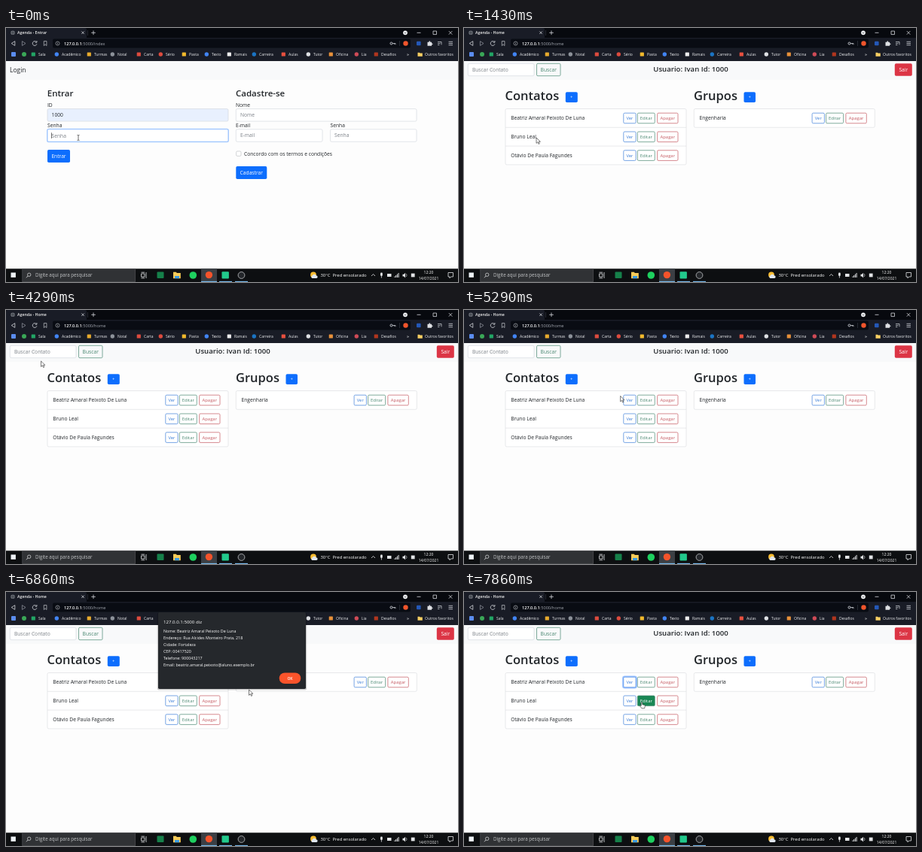
An HTML page that plays this animation: 600x338 px, repeating every 8000 ms.

```html
<!DOCTYPE html>
<html lang="pt-BR">
<head>
<meta charset="utf-8">
<title>Agenda</title>
<style>
html, body { margin: 0; width: 100%; height: 100%; overflow: hidden; background: #fdfdfd; }
svg { display: block; width: 100%; height: 100%; }
text { font-family: "Open Sans", "Noto Sans", sans-serif; white-space: pre; }
</style>
</head>
<body>
<svg id="stage" viewBox="0 0 600 338"></svg>
<script>
const LOOP = 8000, FPS = 7;
const BLUE = '#0d6efd', GREEN = '#198754', RED = '#dc3545', INK = '#212529', GREY = '#7b8087';
// Softer tones for thin outlines and their labels
const SOFT = { [BLUE]: '#3d7fd8', [GREEN]: '#4a8871', [RED]: '#c4575f' };
const stage = document.getElementById('stage');

// Markup helpers
const rect = (x, y, w, h, fill, extra = '') =>
  `<rect x="${x}" y="${y}" width="${w}" height="${h}" fill="${fill}" ${extra}/>`;
const circle = (x, y, r, fill, extra = '') =>
  `<circle cx="${x}" cy="${y}" r="${r}" fill="${fill}" ${extra}/>`;
const text = (x, y, size, str, fill = INK, extra = '') =>
  `<text x="${x}" y="${y}" font-size="${size}" fill="${fill}" ${extra}>${str}</text>`;
const line = (d, color = '#d5d7dc', w = 0.8, extra = '') =>
  `<path d="${d}" fill="none" stroke="${color}" stroke-width="${w}" ${extra}/>`;
const group = (id, body) => `<g id="${id}">${body}</g>`;
const MID = 'text-anchor="middle"', BOLD = 'font-weight="600"';

const heading = (x, y, size, str) => text(x, y, size, str, INK, BOLD);
const label = (x, y, str) => text(x, y, 6.7, str);
const field = (x, y, w, hint, fill = '#fff', h = 16.5) =>
  rect(x, y, w, h, fill, 'rx="1.8" stroke="#ced4da" stroke-width=".6"') +
  text(x + 5.6, y + h / 2 + 2.4, 6.7, hint, GREY);
const solid = (x, y, w, h, str, fill, size = 6.7) =>
  rect(x, y, w, h, fill, 'rx="1.8"') + text(x + w / 2, y + h / 2 + size * 0.36, size, str, '#fff', MID);

// Outline buttons that fill on hover
const buttons = [];
function outline(x, y, w, h, str, color, size = 5.9) {
  buttons.push({ x, y, w, h, color });
  return `<g class="btn">` +
    rect(x, y, w, h, 'transparent', `rx="1.5" stroke="${SOFT[color]}" stroke-width=".7"`) +
    text(x + w / 2, y + h / 2 + size * 0.36, size, str, SOFT[color], MID) + '</g>';
}
const contactRow = (x, y, name) =>
  text(x + 7.2, y + 15.2, 6.7, name) +
  outline(x + 156.8, y + 6.2, 16.3, 13.6, 'Ver', BLUE) +
  outline(x + 175.3, y + 6.2, 23, 13.6, 'Editar', GREEN) +
  outline(x + 201.6, y + 6.2, 27.4, 13.6, 'Apagar', RED);
function list(x, names) {
  const h = 24.8;
  return rect(x, 107.5, 240, h * names.length, '#fff', 'rx="1.8" stroke="#d9dbdd" stroke-width=".6"') +
    names.map((n, i) =>
      (i ? line(`M${x} ${107.5 + h * i}h240`, '#d9dbdd', 0.6) : '') + contactRow(x, 107 + h * i, n)).join('');
}

function browser() {
  const marks = [
    [43, 'Sala', '#22a565'], [74, 'Acadêmico', '#4285f4'], [117, 'Turmas', '#e8ab2d'],
    [148, 'Notal', '#8d929a'], [183, 'Carta', '#dd4b3e'], [212, 'Sério', '#dd4b3e'],
    [243, 'Pasta', '#f2b92c'], [273, 'Texto', '#4285f4'], [303, 'Ramais', '#eeeeee'],
    [336, 'Carreira', '#1b74c4'], [375, 'Aulas', '#e8503f'], [408, 'Tutor', '#dfe1e4'],
    [438, 'Oficina', '#e8913a'], [472, 'Lia', '#cf4b57'], [498, 'Desafios', '#b1361e']];
  const pale = '#c6c9cf';
  return rect(0, 0, 600, 13, '#07090e') + rect(0, 13, 600, 31, '#191c26') +
    '<path d="M0 13V2q0-2 2-2H105q2 0 2 2V13z" fill="#191c26"/>' +
    circle(9, 6.3, 2.8, '#6d7179') + line('M6.3 6.3h5.4M9 3.6v5.4', '#272a32', 0.6) +
    text(15, 8.3, 5.25, '', '#f1f1f1', 'id="tab" ' + BOLD) +
    line('M100.3 4.5l3.5 3.5m0-3.5l-3.5 3.5') + line('M108.5 3v7', '#454954', 0.5) +
    line('M113.2 6.3h5.6M116 3.5v5.6') +
    circle(530, 6.3, 2.9, '#eef0f2') + line('M528.7 5.8l1.3 1.4 1.3-1.4', '#15171e', 0.6) +
    line('M545.5 6.3h5M567 4.1h4.5v4.5h-4.5zM587.8 4.1l4.5 4.5m0-4.5l-4.500 4.5') +
    line('M11.8 17.6v5.8l-4.6-2.9z') + line('M21.4 17.6v5.8l4.6-2.9z', '#8b8f98') +
    line('M40.3 18.6a2.9 2.9 0 1 0 .6 2.7M40.9 17v2.2h-2.2') +
    line('M50.3 17.5h3.6v6l-1.8-1.6-1.8 1.6z', pale, 0.7) +
    rect(62, 14.6, 475, 11.8, '#090c13', 'rx="2"') +
    circle(68.5, 20.5, 2.5, 'none', `stroke="${pale}" stroke-width=".6"`) +
    line('M68.5 20v1.8M68.5 18.8v.6', pale, 0.6) +
    text(77, 22.6, 5.6, `<tspan fill="#fff" ${BOLD}>127.0.0.1</tspan><tspan id="path"></tspan>`, '#a4a8b0') +
    circle(511.5, 20.5, 1.5, 'none', `stroke="${pale}"`) + line('M513 20.5h4v1.7m-1.7-1.7v1.4', pale) +
    line('M522.5 17v7', '#444853', 0.5) + circle(530.5, 20.5, 3.2, '#f2552c') +
    rect(545, 17.8, 5.6, 5.4, '#2458b8', 'rx="1"') +
    '<path d="M559.5 18.8h2q-.4-1.6.8-1.6t.8 1.6h2v1.7q1.400-.2 1.400.8t-1.400.8v1.700h-5.600z" fill="#dfe1e5"/>' +
    line('M573 18.5h5m-5 2h3.4m-3.4 2h2.4m2.6-4v3.8', pale) +
    line('M587.5 18.3h5.5m-5.5 2.2h5.5m-5.5 2.2h5.5') +
    rect(7, 32, 6, 6, '#5b8def', 'rx="1"') + circle(24, 35, 3, '#3aa757') +
    marks.map(([x, s, c], i) =>
      (i % 2 ? circle(x - 6.7, 35, 2.7, c) : rect(x - 9.3, 32.4, 5.2, 5.2, c, 'rx=".7"')) +
      text(x, 36.9, 5, s, '#f0f1f3')).join('') +
    text(532, 37, 6, '»', '#f0f1f3') +
    '<path d="M546.5 32.7h2.4l.8.9h3.1v4.2h-6.3z" fill="#f7cf63"/>' +
    text(556, 36.9, 5, 'Outros favoritos', '#f0f1f3');
}

function taskbar() {
  const pale = '#e2e4e6';
  return rect(0, 320.3, 600, 17.7, '#0d0f11') +
    rect(6.5, 325.5, 6.4, 6.4, '#eef3f7') +
    rect(21.8, 320.6, 149.8, 17.1, '#303235', 'stroke="#505255" stroke-width=".7"') +
    circle(30.7, 328.3, 2.2, 'none', `stroke="${pale}" stroke-width=".7"`) + line('M29.1 330l-2.2 2.3', pale) +
    text(39, 331.4, 6.2, 'Digite aqui para pesquisar', '#c3c5c7') +
    line('M179.5 327h4.5v4h-4.5zM179.5 325.2h4.5M179.5 332.8h4.5M186 325v8', pale) +
    rect(200.5, 324.5, 9, 8.6, '#16804a', 'rx="1"') +
    '<path d="M222 324.8h3.8l1 1.2h5v7.2h-9.8z" fill="#f6cb58"/>' + rect(224, 330, 6, 3.2, '#3b9be2') +
    circle(248.3, 329, 4.8, '#1ed05f') +
    rect(259, 320.3, 21, 17.7, '#3b3f44') + circle(269.4, 328.6, 4.7, '#f4532b') +
    rect(286.5, 324.2, 9.4, 9.2, '#22c98c', 'rx="1"') +
    circle(312.5, 329, 4.4, '#23262a', 'stroke="#c4c7ca" stroke-width=".8"') +
    [[259, 21], [283, 17], [304, 17]].map(([x, w]) => rect(x, 336.9, w, 1.1, '#78b9ec')).join('') +
    circle(408, 328.5, 3.9, '#f9bd31') +
    '<path d="M406.5 333a2 2 0 0 1 .5-3.8 2.5 2.5 0 0 1 4.6.4 1.7 1.7 0 0 1 .6 3.4z" fill="#dfe6ee"/>' +
    text(417.5, 331.2, 5.9, '30°C  Pred ensolarado', '#fff') +
    line('M485 330l2.5-2.5 2.5 2.5', pale) +
    rect(497, 325.5, 2.8, 4.4, pale, 'rx="1.2"') + line('M498.4 330v2.600', pale) +
    rect(506, 327, 5.5, 4, pale) +
    line('M516 332v-1.5m1.7 1.5v-3m1.7 3v-4.5m1.7 4.5v-6', pale, 1) +
    '<path d="M526.5 327.8h1.6l2-2v6.6l-2-2h-1.6z" fill="#e2e4e6"/>' +
    line('M531.3 327q1.5 2 0 4', pale, 0.6) +
    rect(537.8, 326.6, 4.8, 4.8, pale) +
    text(561, 327, 5, '12:20', '#fff', MID) + text(561, 335, 5, '14/07/2021', '#fff', MID) +
    line('M587 325.5h6.5v5.5h-3l-1.5 1.8v-1.8h-2z', pale);
}

const login = () =>
  text(5, 59.4, 8.5, 'Login') +
  heading(54.8, 91, 11.5, 'Entrar') + heading(305, 91, 11.5, 'Cadastre-se') +
  label(55, 104.6, 'ID') + field(55, 107.6, 240, '', '#e8f0fe') + text(60.6, 118.2, 6.7, '1000') +
  label(55, 131.8, 'Senha') +
  rect(54, 133.7, 242, 18.6, '#bcd6fd', 'rx="2.6"') +
  rect(55, 134.7, 240, 16.6, '#fff', 'rx="1.8" stroke="#86b7fe" stroke-width=".8"') +
  text(60.6, 145.5, 6.7, 'Senha', GREY, 'id="hint"') +
  group('dots', Array.from({ length: 5 }, (_, i) => circle(62 + i * 2.95, 143.1, 1.15, INK)).join('')) +
  line('M0 139.3v7.6', '#111', 0.6, 'id="caret"') +
  solid(55, 162, 30, 17, 'Entrar', BLUE) +
  label(305, 104.6, 'Nome') + field(305.3, 107.6, 239.7, 'Nome') +
  label(305, 131.8, 'E-mail') + field(305.3, 134.8, 114.7, 'E-mail') +
  label(430.5, 131.8, 'Senha') + field(430.5, 134.8, 114.5, 'Senha') +
  rect(305.6, 164, 6.4, 6.4, '#fff', 'rx="1.5" stroke="#b5b9bd" stroke-width=".6"') +
  label(316, 169.8, 'Concordo com os termos e condições') +
  solid(305.3, 184, 41, 17, 'Cadastrar', BLUE);

const home = () =>
  field(5.3, 47.3, 87.7, 'Buscar Contato', '#fff', 16.4) +
  outline(96.5, 47.3, 31.5, 16.4, 'Buscar', GREEN, 6.7) +
  text(301, 58, 9.6, 'Usuario: Ivan Id: 1000', INK, MID + ' ' + BOLD) +
  solid(571.8, 47.3, 23, 16.4, 'Sair', RED) +
  heading(54.5, 95.7, 16.5, 'Contatos') + solid(134.8, 85.3, 16, 13.7, '+', BLUE, 5.9) +
  heading(305, 95.7, 16.5, 'Grupos') + solid(371.5, 85.3, 15.5, 13.7, '+', BLUE, 5.9) +
  list(55, ['Beatriz Amaral Peixoto De Luna', 'Bruno Leal', 'Otávio De Paula Fagundes']) +
  list(305.3, ['Engenharia']) +
  rect(211, 112.4, 17.9, 15.2, 'none', 'id="focus" rx="2.3" stroke="#5c9bfd" stroke-opacity=".6" stroke-width="1.8"');

const dialog = () => {
  const rows = ['Nome: Beatriz Amaral Peixoto De Luna', 'Endereço: Rua Alcides Monteiro Prata, 218',
    'Cidade: Fortaleza', 'CEP: 00417520', 'Telefone: 900043217',
    'Email: beatriz.amaral.peixoto@aluno.exemplo.br'];
  return rect(200.8, 27.5, 198.4, 103, '#000', 'rx="2" opacity=".2"') +
    rect(202, 27, 196, 102, '#25282c', 'rx="1.8"') +
    text(209, 42, 6.1, '127.0.0.1:5000 diz', '#fff') +
    rows.map((s, i) => text(209, 54.1 + i * 8.9, 5.35, s, '#fff')).join('') +
    rect(362.7, 107.5, 28.6, 14.5, '#fb542b', 'rx="7.25"') +
    text(377, 116.6, 5, 'OK', '#fff', MID + ' ' + BOLD);
};

const cursors =
  group('arrow', '<path d="M0 0v7.4l1.8-1.6 1.3 2.7 1.2-.6-1.3-2.6h2.4z" fill="#fff" stroke="#222" stroke-width=".6"/>') +
  group('beam', line('M-1.5-3.6q1.5 0 1.5 1v5.2q0 1-1.5 1M1.5-3.6q-1.5 0-1.5 1M0 2.6q0 1 1.5 1', '#333', 0.7)) +
  group('hand', '<path d="M-.8 0q.8-1 1.6 0v2.7l2.9.7q.7.3.6 1.2l-.6 3.2h-3.8l-2.4-3.2q.2-1.2 1.7-.2z" fill="#fff" stroke="#222" stroke-width=".6"/>');

stage.innerHTML =
  rect(0, 0, 600, 338, '#fdfdfd') + rect(0, 43, 600, 26, '#f8f9fa') +
  group('login', login()) + group('home', home()) + browser() + taskbar() +
  group('dialog', dialog()) + group('cursor', cursors);

const el = {};
stage.querySelectorAll('[id]').forEach(n => el[n.id] = n);
const btnNodes = [...stage.querySelectorAll('.btn')];
const show = (node, on) => node.setAttribute('display', on ? 'inline' : 'none');

// Pointer path: step, x, y
const path = [[0, 96, 146], [12, 96, 146], [17, 306, 53], [20, 306, 53], [27, 60, 60], [30, 46.5, 68],
  [33, 92, 84], [38, 221, 118], [44, 221, 118], [48, 322.5, 130], [51, 378, 115], [52, 378, 115],
  [55, 236, 147], [56, 236, 147]];
function pointer(step) {
  const i = Math.max(1, path.findIndex(p => p[0] >= step));
  const [a, x0, y0] = path[i - 1], [b, x1, y1] = path[i];
  const u = (step - a) / (b - a), e = u * u * (3 - 2 * u);
  return [x0 + (x1 - x0) * e, y0 + (y1 - y0) * e];
}
const inside = (x, y, b) => x >= b.x && x <= b.x + b.w && y >= b.y && y <= b.y + b.h;
const texts = [{ x: 251, y: 48, w: 100, h: 14 }, { x: 5, y: 47, w: 88, h: 17 },
  { x: 55, y: 82, w: 71, h: 16 }, { x: 62, y: 115, w: 98, h: 9 }];

function draw(t) {
  const step = Math.floor((t + 5) * FPS / 1000);
  const atHome = step >= 10, opening = step === 41, open = step >= 41 && step < 52;
  show(el.login, !atHome);
  show(el.home, atHome);
  el.tab.textContent = atHome ? 'Agenda - Home' : 'Agenda - Entrar';
  el.path.textContent = atHome ? ':5000/home' : ':5000/index';

  const typed = Math.max(0, Math.min(5, step - 1));
  [...el.dots.children].forEach((d, i) => show(d, i < typed));
  show(el.hint, !typed);
  el.caret.setAttribute('transform', `translate(${60.5 + typed * 2.95} 0)`);

  const [x, y] = pointer(step);
  const free = atHome && (opening || !open);
  let over = false;
  buttons.forEach((b, i) => {
    const hot = free && inside(x, y, b);
    over = over || hot;
    const [box, name] = btnNodes[i].children;
    box.setAttribute('fill', hot ? b.color : 'transparent');
    name.setAttribute('fill', hot ? '#fff' : SOFT[b.color]);
  });
  show(el.focus, step >= 40);

  show(el.dialog, open);
  el.dialog.setAttribute('opacity', opening ? 0.25 : 1);
  el.dialog.setAttribute('transform', opening ? 'translate(300 72) scale(1.025) translate(-300 -78)' : '');

  const beam = !atHome || (free && !over && texts.some(b => inside(x, y, b)));
  show(el.hand, over);
  show(el.beam, beam);
  show(el.arrow, !over && !beam);
  el.cursor.setAttribute('transform', `translate(${x} ${y})`);
}

const start = performance.now();
function tick() {
  draw((performance.now() - start) % LOOP);
  requestAnimationFrame(tick);
}
tick();
</script>
</body>
</html>
```
